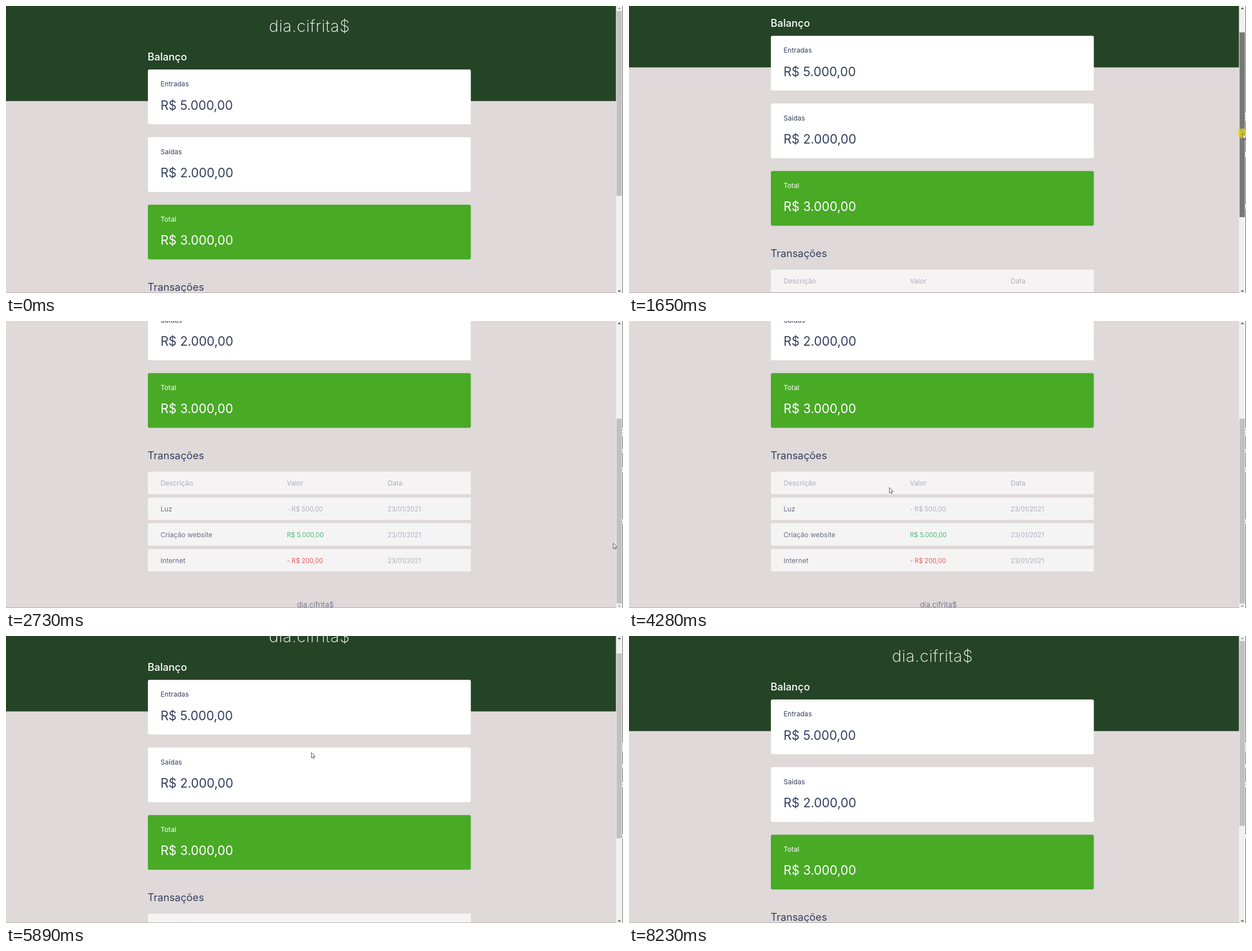
These frames come from a looping animation (1096x511 px, 8320 ms). An HTML page:

```html
<!DOCTYPE html>
<html lang="pt-BR">
<head>
<meta charset="utf-8">
<title>Balanço</title>
<style>
@property --s { syntax: "<number>"; inherits: true; initial-value: 0; }

html, body { margin: 0; width: 100%; height: 100%; overflow: hidden; background: #dfd9d9; }
svg { display: block; width: 1096px; height: 511px; font-family: Inter, Roboto, sans-serif; animation: scroll 8.32s linear infinite; }
svg * { animation-duration: 8.32s; animation-iteration-count: infinite; animation-timing-function: linear; }

#page { transform: translateY(calc(var(--s) * -1px)); }
#thumb { transform: translateY(calc(var(--s) * .632px)); fill: #c1c1c1; animation-name: thumb; animation-timing-function: step-end; }

text { fill: #363f5f; font-size: 12.1px; }
.logo { font-size: 29px; font-weight: 200; letter-spacing: .02em; fill: #fff; text-anchor: middle; }
.h2 { font-size: 18.3px; }
.money { font-size: 22.2px; }
.light text { fill: #fff; }
.row { opacity: .7; animation-timing-function: step-end; }
.row text { fill: #969cb3; }
.row .num { font-size: 11.3px; }
.row .name { fill: #363f5f; }
.row .in { fill: #12a454; }
.row .out { fill: #e92929; }
.foot { font-size: 13px; text-anchor: middle; opacity: .6; }

#row1 { animation-name: hover1; }
#row2 { animation-name: hover2; }
#row3 { animation-name: hover3; }
#cursor { animation-name: move; }
#arrow { animation-name: show; animation-timing-function: step-end; }
#press { animation-name: press; animation-timing-function: step-end; }
#up { animation-name: up; animation-timing-function: step-end; }
#down { animation-name: down; animation-timing-function: step-end; }
#edge { animation-name: edge; animation-timing-function: step-end; }

/* The page scrolls in jumps of about 77 ms. */
@keyframes scroll {
  0% { --s: 0; }
  12.5% { --s: 0; animation-timing-function: steps(3); }
  15.3% { --s: 10; animation-timing-function: steps(5); }
  19.8% { --s: 60; animation-timing-function: steps(4); }
  23.54% { --s: 151.5; animation-timing-function: steps(5); }
  28.1% { --s: 261; }
  62.5% { --s: 261; animation-timing-function: steps(1); }
  63.44% { --s: 211; animation-timing-function: steps(2); }
  65.25% { --s: 46; }
  69.8% { --s: 46; animation-timing-function: steps(1); }
  70.77% { --s: 35; animation-timing-function: steps(2); }
  72.7%, 100% { --s: 0; }
}
@keyframes thumb {
  0% { fill: #c1c1c1; }
  10.8% { fill: #a8a8a8; }
  11.6% { fill: #787878; }
  30% { fill: #a8a8a8; }
  31.5%, 100% { fill: #c1c1c1; }
}
@keyframes move {
  0%, 3.2% { transform: translate(1063px, 495px); }
  7% { transform: translate(1070px, 330px); }
  10.8% { transform: translate(1085px, 205px); }
  12.5% { transform: translate(1089px, 188px); }
  15.3% { transform: translate(1090px, 194px); }
  19.8% { transform: translate(1090px, 226px); }
  23.54% { transform: translate(1086px, 286px); }
  28.1% { transform: translate(1086px, 353px); }
  30% { transform: translate(1085px, 385px); }
  32.8% { transform: translate(1079px, 395px); }
  33.77% { transform: translate(1040px, 402px); }
  37.3% { transform: translate(640px, 430px); }
  39.7% { transform: translate(470px, 440px); }
  43.03%, 43.87% { transform: translate(400px, 387px); }
  45.7% { transform: translate(410px, 360px); }
  49.9% { transform: translate(455px, 314px); }
  53.25% { transform: translate(470px, 275px); }
  60.1%, 67.9% { transform: translate(547px, 206px); }
  68.99%, 73.5% { transform: translate(542px, 207px); }
  80.17% { transform: translate(912px, 131px); }
  82% { transform: translate(985px, 180px); }
  85.7%, 100% { transform: translate(1060px, 492px); }
}
@keyframes show {
  0% { visibility: hidden; }
  3.25% { visibility: visible; }
  86.6%, 100% { visibility: hidden; }
}
@keyframes press {
  0% { visibility: hidden; }
  11.6% { visibility: visible; }
  30%, 100% { visibility: hidden; }
}
@keyframes up {
  0% { fill: #a3a3a3; }
  13.4% { fill: #505050; }
  72.7%, 100% { fill: #a3a3a3; }
}
@keyframes down {
  0% { fill: #505050; }
  28.1% { fill: #a3a3a3; }
  63.4%, 100% { fill: #505050; }
}
@keyframes edge { 0% { visibility: hidden; } 12.5%, 100% { visibility: visible; } }
@keyframes hover3 { 0% { opacity: .7; } 35.6% { opacity: 1; } 41.8%, 100% { opacity: .7; } }
@keyframes hover2 { 0% { opacity: .7; } 42.3% { opacity: 1; } 45.7%, 100% { opacity: .7; } }
@keyframes hover1 { 0% { opacity: .7; } 46.3% { opacity: 1; } 49.9%, 100% { opacity: .7; } }
</style>
</head>
<body>
<svg viewBox="0 0 1096 511">
  <defs>
    <rect id="card" x="252" width="573.7" height="97.4" rx="3"/>
    <path id="cell" d="M825.7 0v40H255a3 3 0 0 1-3-3V3a3 3 0 0 1 3-3z" fill="#fff"/>
  </defs>
  <rect width="1096" height="511" fill="#dfd9d9"/>

  <g id="page">
    <rect width="1084" height="169.3" fill="#254426"/>
    <text class="logo" x="539" y="46">dia.cifrita$</text>
    <text class="h2" x="251.5" y="96.5" style="fill:#fff" font-weight="500">Balanço</text>

    <g transform="translate(0 113)">
      <use href="#card" fill="#fff"/>
      <text x="274.5" y="30">Entradas</text>
      <text class="money" x="274.5" y="71.5">R$ 5.000,00</text>
    </g>
    <g transform="translate(0 233.5)">
      <use href="#card" fill="#fff"/>
      <text x="274.5" y="30">Saídas</text>
      <text class="money" x="274.5" y="71.5">R$ 2.000,00</text>
    </g>
    <g class="light" transform="translate(0 353.8)">
      <use href="#card" fill="#49aa26"/>
      <text x="274.5" y="30">Total</text>
      <text class="money" x="274.5" y="71.5">R$ 3.000,00</text>
    </g>

    <text class="h2" x="251.5" y="507">Transações</text>
    <g class="row" transform="translate(0 529.2)">
      <use href="#cell"/>
      <text x="274.5" y="24.5">Descrição</text>
      <text x="499" y="24.5">Valor</text>
      <text x="678" y="24.5">Data</text>
    </g>
    <g class="row" id="row1" transform="translate(0 575.2)">
      <use href="#cell"/>
      <text class="name" x="274.5" y="24.5">Luz</text>
      <text class="num" x="499" y="24.5">- R$ 500,00</text>
      <text class="num" x="678" y="24.5">23/01/2021</text>
    </g>
    <g class="row" id="row2" transform="translate(0 621.1)">
      <use href="#cell"/>
      <text class="name" x="274.5" y="24.5">Criação website</text>
      <text class="num in" x="499" y="24.5">R$ 5.000,00</text>
      <text class="num" x="678" y="24.5">23/01/2021</text>
    </g>
    <g class="row" id="row3" transform="translate(0 667)">
      <use href="#cell"/>
      <text class="name" x="274.5" y="24.5">Internet</text>
      <text class="num out" x="499" y="24.5">- R$ 200,00</text>
      <text class="num" x="678" y="24.5">23/01/2021</text>
    </g>
    <text class="foot" x="549.5" y="771">dia.cifrita$</text>
  </g>

  <rect x="1083.5" width="12" height="511" fill="#f1f1f1"/>
  <rect id="thumb" x="1084.5" y="9" width="9.5" height="329"/>
  <path id="up" d="M1086.5 5.5l3-3 3 3z"/>
  <path id="down" d="M1086.5 506.5l3 3 3-3z"/>
  <rect x="1095" width="1" height="511" fill="#6b6b6b"/>
  <path id="edge" d="M1095.5 190v16m0 22v7m0 25v10m0 83v8" stroke="#f4f4f4" stroke-dasharray="4 1"/>
  <rect y="510" width="1084" height="1" fill="#b5b0b0"/>

  <g id="cursor">
    <circle id="press" r="9" fill="#e6dc00" fill-opacity=".7"/>
    <path id="arrow" d="M.5.5v9.6l2.2-2 1.5 3.2 1.5-.7-1.4-3.1h3z" fill="#fff" stroke="#333" stroke-width=".8"/>
  </g>
</svg>
</body>
</html>
```
